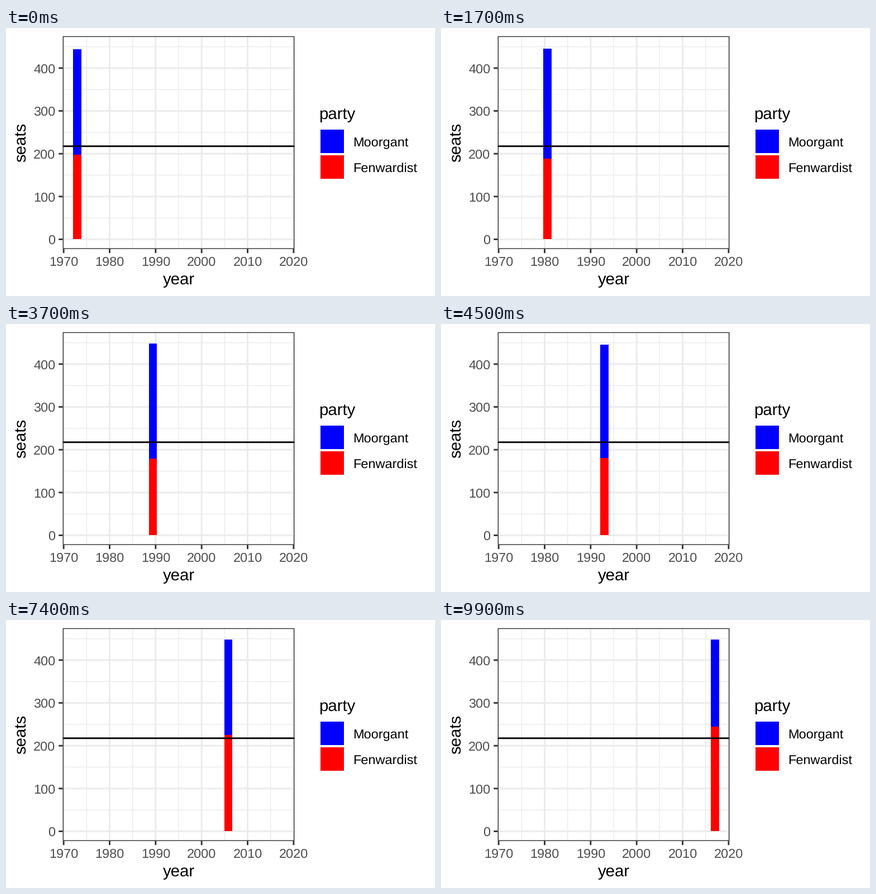
A matplotlib script that plays this animation: 768x480 px, repeating every 10000 ms.

```python
import numpy as np
import matplotlib.pyplot as plt
from matplotlib.animation import FuncAnimation
from matplotlib.patches import Rectangle

plt.rcParams["font.family"] = "Liberation Sans"
plt.rcParams["text.hinting"] = "none"

W, H, DPI = 768, 480, 96
PT = 72 / DPI
FRAMES, INTERVAL = 100, 100

# Panel edges in pixels, y pointing down
LEFT, RIGHT, TOP, BOTTOM = 101.62, 516.45, 14.67, 395.8
BAR_WIDTH = 1.8
THICK, THIN = 2.845, 1.42
TICK = 7.33
SMALL, LARGE = 23.47, 29.33
GRID, DARK, LABEL = "#ebebeb", "#333333", "#4d4d4d"
BLUE, RED = "#0000ff", "#ff0000"
MAJORITY = 217.5

years = np.arange(1973, 2018, 2)
red_seats = np.array([197, 147, 147, 160, 196, 169, 184, 180, 181, 170, 181, 236,
                      230, 225, 226, 232, 237, 207, 182, 245, 238, 251, 245])
all_seats = np.array([444, 442, 443, 442, 447, 443, 443, 447, 449, 447, 445, 449,
                      443, 441.5, 448, 443, 445, 452, 450, 448, 451, 445, 448])

# Each survey lands on a whole frame
keys = np.round(1 + np.arange(len(years)) * (FRAMES - 1) / (len(years) - 1)) - 1

X_SCALE = (RIGHT - LEFT) / 50.38
Y_SCALE = (BOTTOM - TOP) / 497.2


def px(year):
    return LEFT + (year - 1969.81) * X_SCALE


def py(seats):
    return BOTTOM - (seats + 22.6) * Y_SCALE


fig = plt.figure(figsize=(W / DPI, H / DPI), dpi=DPI, facecolor="white")
ax = fig.add_axes([0, 0, 1, 1])
ax.set_xlim(0, W)
ax.set_ylim(H, 0)
ax.axis("off")


def line(xs, ys, color, width, z):
    ax.plot(xs, ys, color=color, lw=width * PT, zorder=z,
            solid_capstyle="butt", snap=False)


def label(x, y, text, size, color="black", ha="left", **kw):
    ax.text(x, y, text, fontsize=size * PT, color=color, ha=ha,
            va="baseline", **kw)


def block(x, y, w, h, color):
    return ax.add_patch(Rectangle((x, y), w, h, fc=color, lw=0,
                                  antialiased=False, zorder=3))


def place(bar, x0, x1, low, high):
    y0, y1 = round(py(high)), round(py(low))
    bar.set_bounds(x0, y0, x1 - x0, y1 - y0)


# Grid
for year in range(1975, 2020, 10):
    line([px(year)] * 2, [TOP, BOTTOM], GRID, THIN, 1)
for seats in range(50, 500, 100):
    line([LEFT, RIGHT], [py(seats)] * 2, GRID, THIN, 1)
for year in range(1970, 2021, 10):
    x = px(year)
    line([x, x], [TOP, BOTTOM], GRID, THICK, 2)
    line([x, x], [BOTTOM, BOTTOM + TICK], DARK, THICK, 2)
    label(x, 425.9, str(year), SMALL, LABEL, "center")
for seats in range(0, 401, 100):
    y = py(seats)
    line([LEFT, RIGHT], [y, y], GRID, THICK, 2)
    line([LEFT - TICK, LEFT], [y, y], DARK, THICK, 2)
    label(88.4, y + 8.6, str(seats), SMALL, LABEL, "right")

# Majority line and panel border
line([LEFT, RIGHT], [py(MAJORITY)] * 2, "black", THICK, 4)
ax.add_patch(Rectangle((LEFT + THIN / 2, TOP + THIN / 2),
                       RIGHT - LEFT - THIN, BOTTOM - TOP - THIN,
                       fill=False, ec=DARK, lw=THIN * PT, snap=False, zorder=5))

# Titles
mid_x, mid_y = (LEFT + RIGHT) / 2, (TOP + BOTTOM) / 2
label(mid_x, 459.3, "year", LARGE, ha="center")
label(35.8, mid_y, "seats", LARGE, ha="center", rotation=90,
      rotation_mode="anchor")

# Legend
label(560.5, 163, "party", LARGE)
for y, color, name in ((182, BLUE, "Moorgant"), (228, RED, "Fenwardist")):
    block(563, y, 42, 42, color)
    label(621.2, y + 30, name, SMALL)

blue_bar = block(0, 0, 1, 1, BLUE)
red_bar = block(0, 0, 1, 1, RED)


def update(i):
    year, red, total = (np.interp(i, keys, v) for v in (years, red_seats, all_seats))
    x0 = round(px(year - BAR_WIDTH / 2))
    x1 = round(px(year + BAR_WIDTH / 2))
    place(red_bar, x0, x1, 0, red)
    place(blue_bar, x0, x1, red, total)
    return red_bar, blue_bar


anim = FuncAnimation(fig, update, frames=FRAMES, interval=INTERVAL,
                     repeat=True, repeat_delay=0)
plt.show()
```
